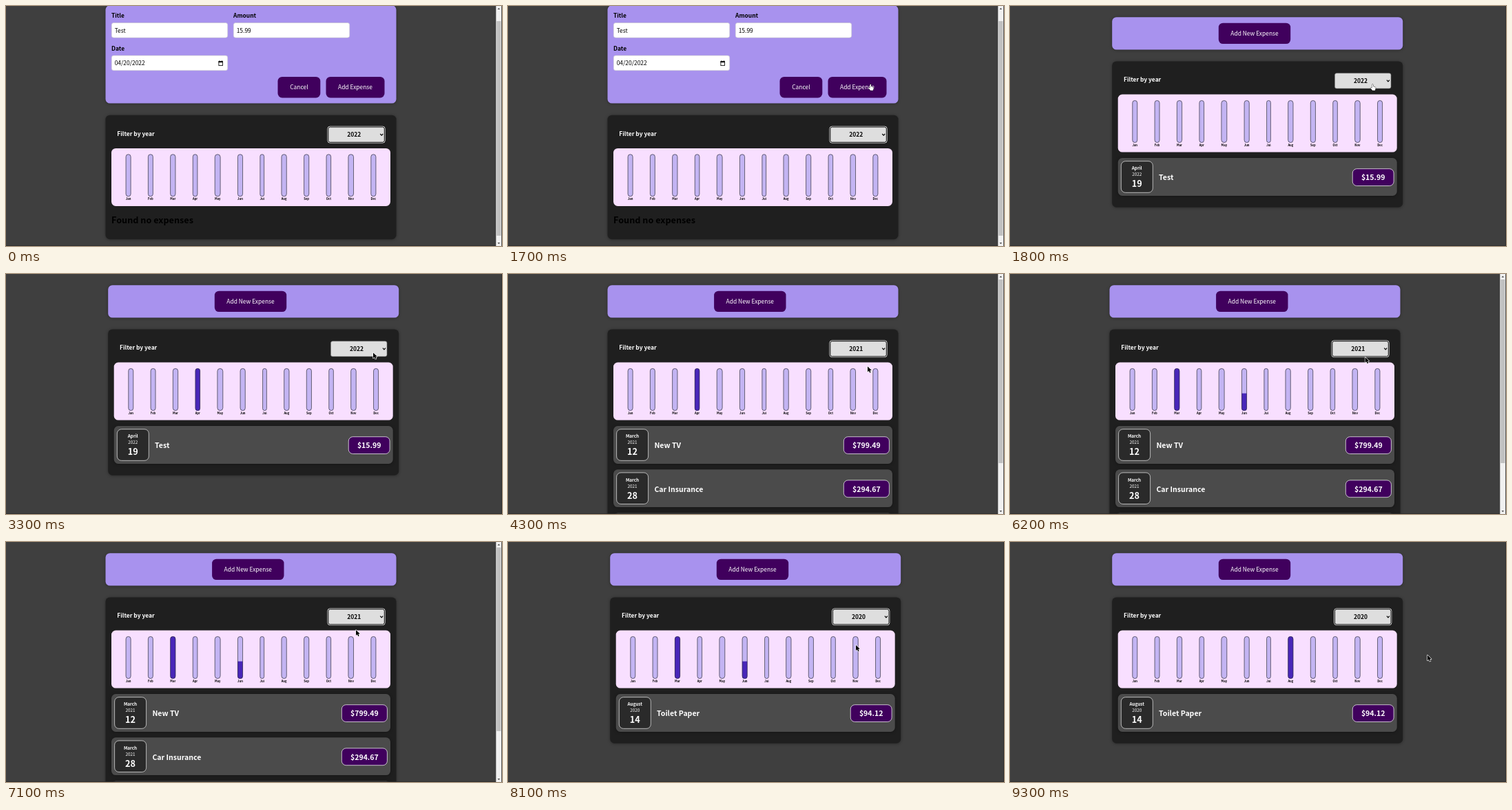
An HTML page with a canvas that plays this animation: 720 by 349 pixels, repeating every 9.9 s.

```html
<!DOCTYPE html>
<html lang="en">
<head>
<meta charset="utf-8">
<title>Expense tracker</title>
<style>
  html, body { margin: 0; width: 100%; height: 100%; overflow: hidden; background: #3f3f3f; }
  canvas { display: block; }
</style>
</head>
<body>
<canvas id="stage" width="720" height="349"></canvas>
<script>
const ctx = document.getElementById('stage').getContext('2d');
const LOOP = 9900, STEP = 100, FADE = 300;
const REM = 8.44, RADIUS = 6.3, CARD_W = 422;
const FAMILY = '"Noto Sans CJK JP", "Noto Sans CJK SC", "Noto Sans CJK", "Noto Sans", sans-serif';
const MONTHS = ['Jan', 'Feb', 'Mar', 'Apr', 'May', 'Jun', 'Jul', 'Aug', 'Sep', 'Oct', 'Nov', 'Dec'];

const VIEWS = [
  { from: 0, year: 2022, form: true, focus: true, scroll: [22, 334], fills: {}, items: [] },
  { from: 1800, year: 2022, fills: { 3: 1 },
    items: [['April', 19, 'Test', '$15.99']] },
  { from: 4300, year: 2021, focus: true, scroll: [8, 275], fills: { 2: 1, 5: 0.41 },
    items: [['March', 12, 'New TV', '$799.49'], ['March', 28, 'Car Insurance', '$294.67'], ['June', 12, 'New Desk', '$450.00']] },
  { from: 8100, year: 2020, focus: true, fills: { 7: 1 },
    items: [['August', 14, 'Toilet Paper', '$94.12']] }
];

// time, x, y of the pointer tip
const POINTER = [
  [600, 541, 150], [1000, 525.5, 113.5, 'hand'], [2800, 527, 114], [3100, 531, 115],
  [3300, 533, 114.5], [4300, 522, 134.5], [6200, 515.5, 121], [6300, 513, 117],
  [6400, 511, 112], [7100, 508, 128], [8100, 505, 150], [8800, 530, 157], [9300, 606, 164.5]
];

function box(x, y, w, h, r, fill, stroke, line = 0.8) {
  ctx.beginPath();
  ctx.roundRect(x, y, w, h, r);
  if (fill) { ctx.fillStyle = fill; ctx.fill(); }
  if (stroke) { ctx.strokeStyle = stroke; ctx.lineWidth = line; ctx.stroke(); }
}

function card(x, y, w, h, fill) {
  ctx.save();
  ctx.shadowColor = 'rgba(0,0,0,.35)';
  ctx.shadowBlur = 4.5;
  ctx.shadowOffsetY = 0.6;
  box(x, y, w, h, RADIUS, fill);
  ctx.restore();
}

function setFont(size, bold) {
  ctx.font = `${bold ? 700 : 400} ${size}px ${FAMILY}`;
}

// y is the middle of the capitals
function text(str, x, y, { size = REM, bold = false, color = '#fff', align = 'left' } = {}) {
  setFont(size, bold);
  ctx.fillStyle = color;
  ctx.textAlign = align;
  ctx.fillText(str, x, y + size * 0.367);
}

function button(label, x, y, w) {
  box(x, y, w, 30.4, RADIUS, '#40005d');
  text(label, x + w / 2, y + 15.4, { align: 'center' });
}

function field(label, value, x, y) {
  text(label, x, y, { bold: true, color: '#000' });
  box(x + 0.3, y + 10.3, 168.4, 21.6, 3, '#fff', '#ccc', 0.6);
  text(value, x + 4.7, y + 21.5, { color: '#000' });
}

function calendarIcon(x, y) {
  ctx.fillStyle = '#111';
  ctx.fillRect(x, y, 6.4, 2);
  ctx.fillRect(x + 1, y - 0.8, 1, 1);
  ctx.fillRect(x + 4.4, y - 0.8, 1, 1);
  ctx.strokeStyle = '#111';
  ctx.lineWidth = 0.9;
  ctx.strokeRect(x + 0.4, y + 0.4, 5.6, 6);
}

function drawForm(x) {
  card(x, -0.8, CARD_W, 142.3, '#a892ee');
  field('Title', 'Test', x + 8.5, 14.2);
  field('Amount', '15.99', x + 185.5, 14.2);
  field('Date', '04/20/2022', x + 8.5, 61.8);
  calendarIcon(x + 164, 80.2);
  button('Cancel', x + 250, 103, 61.8);
  button('Add Expense', x + 320, 103, 85);
}

function drawSelect(x, y, year, focus) {
  const w = 81.5, h = 22.2;
  if (focus) {
    box(x - 0.8, y - 0.8, w + 1.6, h + 1.6, 3.2, null, '#f4f4f4', 1);
    box(x, y, w, h, 2.6, '#dedede', '#151515', 1);
  } else {
    box(x, y, w, h, 2.6, '#dedede', '#767676', 0.6);
  }
  text(year, x + 37.5, y + 11.3, { bold: true, color: '#000', align: 'center' });
  ctx.beginPath();
  ctx.moveTo(x + 75.4, y + 10);
  ctx.lineTo(x + 77.4, y + 12.1);
  ctx.lineTo(x + 79.4, y + 10);
  ctx.strokeStyle = '#000';
  ctx.lineWidth = 1.2;
  ctx.stroke();
}

function drawChart(x, y, fills) {
  box(x, y, 405, 84, RADIUS, '#f8dfff');
  setFont(REM / 2, true);
  const widths = MONTHS.map(m => ctx.measureText(m).width);
  const gap = (405 - 2 * REM - widths.reduce((a, b) => a + b, 0)) / (2 * MONTHS.length);
  const top = y + 8.6, h = 61.6;
  let left = x + REM;
  MONTHS.forEach((month, i) => {
    const w = widths[i];
    left += gap;
    ctx.save();
    box(left, top, w, h, Math.min(RADIUS, w / 2), '#c3b4f3');
    ctx.clip();
    ctx.fillStyle = '#4826b9';
    ctx.fillRect(left, top + h * (1 - fills[i]), w, h * fills[i]);
    ctx.restore();
    box(left + 0.3, top + 0.3, w - 0.6, h - 0.6, w / 2 - 0.3, null, '#313131', 0.65);
    text(month, left + w / 2, y + 73.5, { size: REM / 2, bold: true, color: '#000', align: 'center' });
    left += w + gap;
  });
}

function drawItem(x, y, year, [month, day, title, price]) {
  card(x, y, 405, 54.8, '#4b4b4b');
  box(x + 4.6, y + 4.6, 46, 45.6, RADIUS, '#2a2a2a', '#ececec', 0.7);
  const mid = x + 27.5, center = { align: 'center' };
  text(month, mid, y + 15, { ...center, size: REM * 0.75, bold: true });
  text(year, mid, y + 24, { ...center, size: REM * 0.75 });
  text(day, mid, y + 37.7, { ...center, size: REM * 1.5, bold: true });

  const size = REM * 1.25;
  text(title, x + 59.4, y + 28.5, { size, bold: true });
  const w = ctx.measureText(price).width + 3 * REM;
  box(x + 400.4 - w, y + 15.6, w, 24.8, RADIUS, '#40005d', '#fff', 0.7);
  text(price, x + 400.4 - w / 2, y + 28.4, { size, bold: true, align: 'center' });
}

function drawPanel(x, y, view, fills) {
  const rows = view.items.length;
  card(x, y, CARD_W, rows ? 149 + rows * 63.3 : 180.5, '#1f1f1f');
  text('Filter by year', x + 16.8, y + 27, { bold: true });
  drawSelect(x + 323.3, y + 17.3, view.year, view.focus);
  drawChart(x + 8.5, y + 48.2, fills);
  view.items.forEach((item, i) => drawItem(x + 8.5, y + 140.7 + i * 63.2, view.year, item));
  if (!rows) text('Found no expenses', x + 8.5, y + 153, { size: REM * 1.5, bold: true, color: '#000' });
}

function triangle(x, y, h) {
  ctx.beginPath();
  ctx.moveTo(x - 1.8, y);
  ctx.lineTo(x + 1.8, y);
  ctx.lineTo(x, y + h);
  ctx.fillStyle = '#505050';
  ctx.fill();
}

function drawScrollbar([top, bottom]) {
  ctx.fillStyle = '#f1f1f1';
  ctx.fillRect(711.3, 0, 7.9, 349);
  ctx.fillStyle = '#c1c1c1';
  ctx.fillRect(712.2, top, 6.2, bottom - top);
  triangle(715.3, 5, -2.2);
  triangle(715.3, 344, 2.2);
}

function drawPointer(x, y, hand) {
  const shape = hand
    ? 'M0 0.7Q0.8 -0.4 1.5 0.7L1.6 3.6L4.6 4.4Q5.4 4.8 5.2 6L4.4 9.2L0.6 9.2L-2.2 5.8Q-1.8 4.6 -0.6 5.4L0 6Z'
    : 'M0 0L0 8L1.9 6.3L3.2 9.2L4.6 8.6L3.4 5.8L5.8 5.6Z';
  const path = new Path2D(shape);
  ctx.save();
  ctx.translate(x, y);
  ctx.lineJoin = 'round';
  ctx.lineWidth = hand ? 0.8 : 1.2;
  ctx.strokeStyle = hand ? '#111' : '#fff';
  ctx.fillStyle = hand ? '#fff' : '#000';
  ctx.stroke(path);
  ctx.fill(path);
  ctx.restore();
}

const easeOut = p => 1 - (1 - p) ** 1.8;

function fillsAt(t, index) {
  const now = VIEWS[index], before = VIEWS[Math.max(0, index - 1)];
  const p = easeOut(Math.min(1, (t - now.from) / FADE));
  return MONTHS.map((_, i) => {
    const a = before.fills[i] || 0, b = now.fills[i] || 0;
    return a + (b - a) * p;
  });
}

function draw(t) {
  const index = VIEWS.findLastIndex(v => t >= v.from);
  const view = VIEWS[index];
  const x = view.scroll ? 144.5 : 148.2;

  ctx.fillStyle = '#3f3f3f';
  ctx.fillRect(0, 0, 720, 349);

  if (view.form) {
    drawForm(x);
  } else {
    card(x, 16.2, CARD_W, 47.4, '#a892ee');
    button('Add New Expense', x + 154.6, 24.7, 104.4);
  }
  drawPanel(x, view.form ? 158.7 : 80.4, view, fillsAt(t, index));

  ctx.fillStyle = '#2b2b2b';
  ctx.fillRect(0, 348.2, 720, 0.8);
  ctx.fillRect(719.2, 0, 0.8, 349);
  if (view.scroll) drawScrollbar(view.scroll);

  const spot = POINTER.findLast(p => t >= p[0]);
  if (spot) drawPointer(spot[1], spot[2], spot[3]);
}

const start = performance.now();
function tick() {
  const t = (performance.now() - start) % LOOP;
  draw(Math.floor(t / STEP) * STEP);
  requestAnimationFrame(tick);
}
tick();
</script>
</body>
</html>
```
